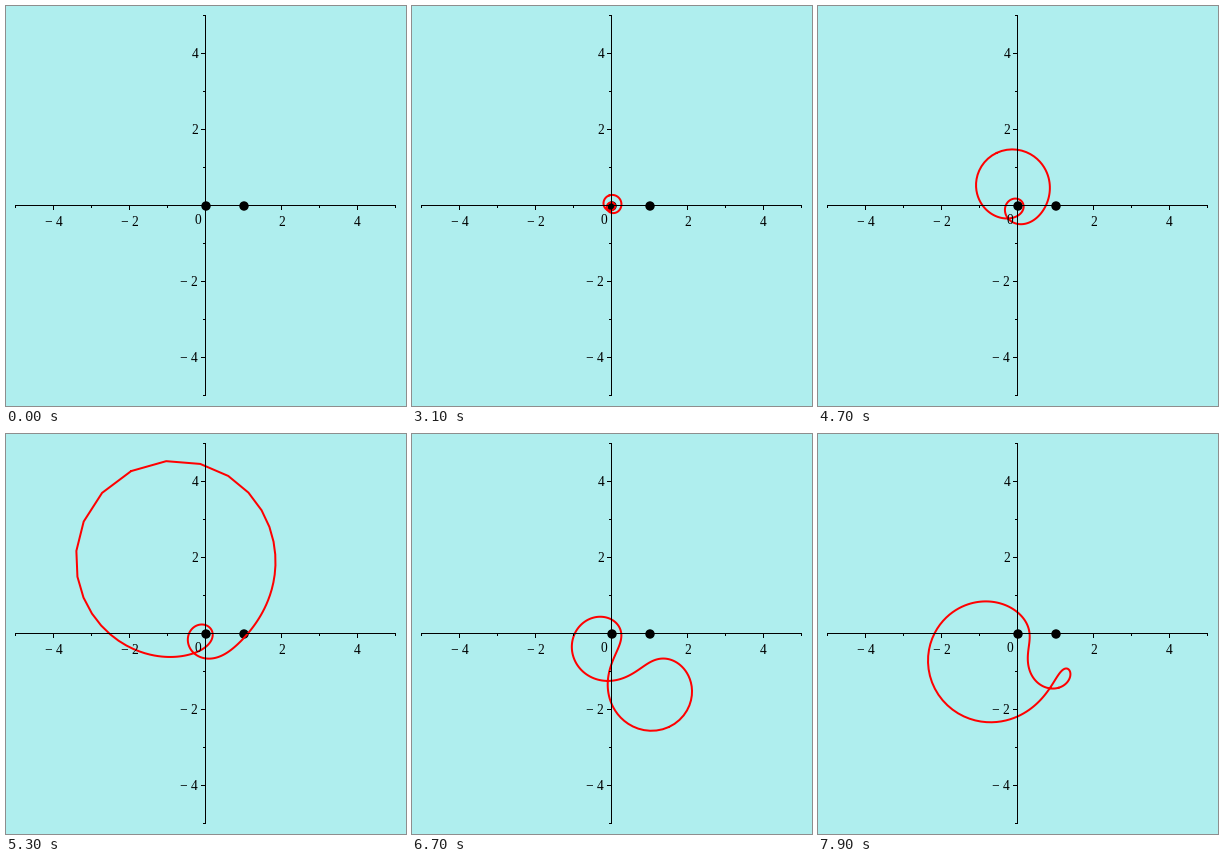
Write a matplotlib script that moves like this. It is 400 by 400 pixels and loops after 8 s.

```python
import numpy as np
import matplotlib.pyplot as plt
from matplotlib.animation import FuncAnimation
from matplotlib.patches import Circle, Rectangle

plt.rcParams["path.simplify"] = False

SIZE, DPI = 400, 100
MID, UNIT = 200, 38
FRAMES, STEP = 80, 100
PX = 72 / DPI  # points per pixel

fig = plt.figure(figsize=(SIZE / DPI, SIZE / DPI), dpi=DPI, facecolor="#afeeee")
ax = fig.add_axes([0, 0, 1, 1])
ax.set_xlim(0, SIZE)
ax.set_ylim(SIZE, 0)
ax.axis("off")


def bar(x, y, w, h):
    ax.add_patch(Rectangle((x, y), w, h, fc="black", lw=0, snap=False, zorder=4))


def label(x, y, text, align="center"):
    ax.text(x, y, text, ha=align, va="center_baseline", color="black",
            family="Liberation Serif", size=13.5 * PX, zorder=4)


def draw_axes():
    c = MID - 1  # pixel row and column of the axes
    span = 10 * UNIT + 1
    bar(c - 5 * UNIT, c, span, 1)
    bar(c, c - 5 * UNIT, 1, span)
    for n in range(-5, 6):
        if n == 0:
            continue
        length = 2 if n % 2 else 4
        x, y = c + n * UNIT, c - n * UNIT
        bar(x, c + 1, 1, length)
        bar(c - length, y, length, 1)
        if n % 2 == 0:
            text = str(n).replace("-", "\u2212 ")
            label(x + 0.5, 215, text)
            label(192, y + 0.5, text, "right")
    label(192, 213, "0")


def dot(value):
    ax.add_patch(Circle((MID + UNIT * value, MID), 4.7, fc="black", lw=0, zorder=2))


draw_axes()
dot(0)
dot(1)

window = Rectangle((5, 5), 390, 390, transform=ax.transData)
curve, = ax.plot([], [], color="red", lw=2 * PX, zorder=3,
                 solid_capstyle="round", solid_joinstyle="round")
curve.set_clip_path(window)

circle = np.exp(1j * np.linspace(0, 2 * np.pi, 401))


def image(z):
    return z ** 2 / ((z - 1) * (z + 2j))


def radius(k):
    return (0.402 + 0.0105 * k) ** 2


def update(k):
    if k == 0:
        curve.set_data([], [])
    else:
        w = image(radius(k) * circle)
        curve.set_data(MID + UNIT * w.real, MID - UNIT * w.imag)
    return curve,


anim = FuncAnimation(fig, update, frames=FRAMES, interval=STEP,
                     repeat=True, repeat_delay=0)
plt.show()
```
